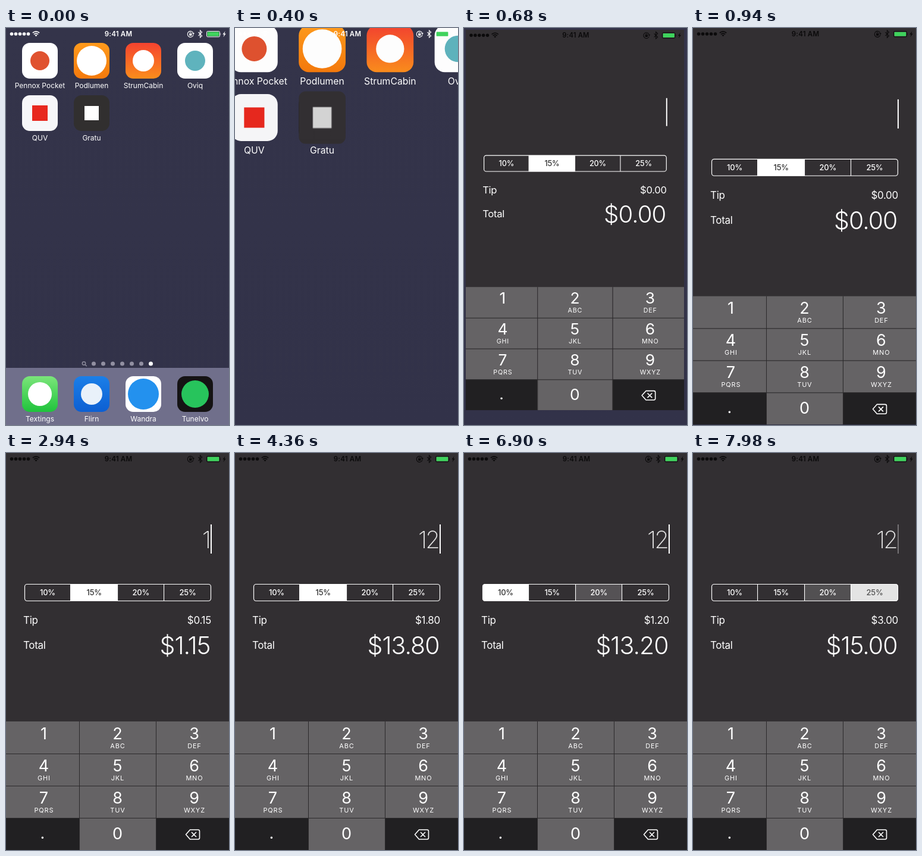
These frames come from a looping animation (375 px wide and 667 px high, 8 s). An HTML page:

```html
<!DOCTYPE html>
<html lang="en">
<head>
<meta charset="utf-8">
<title>Tip calculator</title>
<style>
  html, body { margin: 0; width: 100%; height: 100%; overflow: hidden; background: #333349; }
  svg { display: block; width: 375px; height: 667px; font-family: Inter, Roboto, sans-serif; fill: #fff; }
  .label { font-size: 12px; text-anchor: middle; }
  .clock { font-size: 11.5px; font-weight: 600; text-anchor: middle; letter-spacing: .2px; }
  .seg { font-size: 13px; font-weight: 500; text-anchor: middle; letter-spacing: -.2px; }
  .row { font-size: 17px; letter-spacing: -.3px; }
  .end { text-anchor: end; }
  .bill { font-size: 40px; font-weight: 200; letter-spacing: -3px; fill: #e4e4e4; }
  .total { font-size: 41px; font-weight: 300; letter-spacing: -1px; }
  .digit { font-size: 27px; text-anchor: middle; }
  .abc { font-size: 11px; text-anchor: middle; letter-spacing: .8px; }
</style>
</head>
<body>
<svg id="stage" viewBox="0 0 375 667"></svg>
<script>
const LOOP = 8000, OPEN = 380, SETTLED = 1400;
const DARK = '#322f32', KEY = '#656365', KEY_DOWN = '#212022';
const stage = document.getElementById('stage');

const text = (x, y, cls, str, extra = '') => `<text x="${x}" y="${y}" class="${cls}" ${extra}>${str}</text>`;
const rect = (x, y, w, h, extra = '') => `<rect x="${x}" y="${y}" width="${w}" height="${h}" ${extra}/>`;
const dot = (x, y, r, extra = '') => `<circle cx="${x}" cy="${y}" r="${r}" ${extra}/>`;
const times = (n, fn) => Array.from({ length: n }, (_, i) => fn(i)).join('');

function statusBar(color) {
  const line = `fill="none" stroke="${color}"`;
  return `<g fill="${color}">
    ${times(5, i => dot(9.5 + 7 * i, 10, 2.8))}
    <path d="M44.8 8.2Q50.5 3.4 56.2 8.2M46.9 10.6Q50.5 7.6 54.1 10.6" ${line} stroke-width="1.7"/>
    <path d="M48.4 12.1Q50.5 10.6 52.6 12.1L50.5 14.3Z"/>
    ${text(189, 14.2, 'clock', '9:41 AM')}
    <path d="M314.8 8.2A5 5 0 1 0 315 12" ${line} stroke-width="1.1"/>
    <path d="M313 8.6h4l-2 2.8z"/>
    ${rect(308.2, 9.4, 4.2, 3.4)}
    <path d="M309 9.6V8.6a1.3 1.3 0 0 1 2.6 0v1" ${line} stroke-width=".9"/>
    <path d="M323.4 7l6.2 6.2-3.1 2.9V4l3.1 2.9-6.2 6.2" ${line} stroke-width="1.1"/>
    ${rect(337.5, 5.5, 22, 9.4, `rx="1.8" ${line}`)}
    ${rect(338.6, 6.6, 19.8, 7.2, 'rx=".8" style="fill:#3fd35d"')}
    <path d="M360.6 8.4q1.6 1.7 0 3.4z"/>
    <path d="M368.6 5.2l-4.2 5.6h2.4l-1.4 4.4 4.4-5.8h-2.5z"/>
  </g>`;
}

const gradient = (id, top, bottom) => `<linearGradient id="${id}" x1="0" y1="0" x2="0" y2="1">
  <stop stop-color="${top}"/><stop offset="1" stop-color="${bottom}"/></linearGradient>`;

const round = (r, color) => (x, y) => dot(x + 30, y + 30, r, `fill="${color}"`);
const square = (a, color) => (x, y) => rect(x + 30 - a / 2, y + 30 - a / 2, a, a, `fill="${color}"`);

const apps = [
  ['Pennox Pocket', '#fff', round(16, '#e0522f')],
  ['Podlumen', 'url(#orange)', round(25, '#fff')],
  ['StrumCabin', 'url(#amber)', round(18, '#fff')],
  ['Oviq', '#fff', round(17, '#5fb3bd')],
  ['QUV', '#f7f7f9', square(26, '#e8281e')],
  ['Gratu', '#312f2f', square(24, '#fff')],
  ['Textings', 'url(#green)', round(20, '#fff')],
  ['Flirn', 'url(#blue)', round(18, '#e9f1fa')],
  ['Wandra', '#fff', round(26, '#2391ee')],
  ['Tunelvo', '#151314', round(23, '#27c45c')]
];

function appIcon([name, fill, mark], i) {
  const col = i < 6 ? i % 4 : i - 6;
  const x = 27 + 87 * col, y = i < 4 ? 25 : i < 6 ? 113 : 585;
  return rect(x, y, 60, 60, `rx="13" fill="${fill}"`) + mark(x, y) + text(x + 30, y + 76, 'label', name);
}

const home = `
  ${rect(0, 571, 375, 96, 'fill="#706f8b"')}
  ${apps.map(appIcon).join('')}
  <g fill="none" stroke="#8d8c9c" stroke-width="1.5">${dot(131, 563.5, 2.7)}<path d="M133 565.5l2.8 2.8"/></g>
  ${times(7, i => dot(147.5 + 16 * i, 564, 3.5, `fill="${i < 6 ? '#918fa1' : '#fff'}"`))}
  ${rect(114, 113, 60, 60, 'id="press" rx="13" fill="#000" opacity="0"')}`;

// Segmented control
const edges = [31, 108.5, 187.5, 265.5, 345], rates = [10, 15, 20, 25];
const segments = `<g clip-path="url(#segClip)">
    ${times(4, i => rect(edges[i], 220, edges[i + 1] - edges[i], 29, `id="fill${i}"`))}
  </g>
  ${rect(31.5, 220.5, 313, 28, 'rx="4" fill="none" stroke="#fff" stroke-width="1.2"')}
  ${times(3, i => rect(edges[i + 1] - .5, 220.5, 1.1, 28))}
  ${times(4, i => text((edges[i] + edges[i + 1]) / 2 + .3, 239, 'seg', rates[i] + '%', `id="rate${i}"`))}`;

// Number pad
const cols = [0, 123, 252, 375], mids = [63.5, 187.5, 316.5];
const groups = ['', 'ABC', 'DEF', 'GHI', 'JKL', 'MNO', 'PQRS', 'TUV', 'WXYZ'];
const pad = rect(0, 451, 375, 216, `fill="${KEY_DOWN}"`) +
  groups.map((abc, i) => {
    const c = i % 3, y = 451 + 54 * Math.floor(i / 3);
    return rect(cols[c], y, cols[c + 1] - cols[c], 54, `id="key${i + 1}" fill="${KEY}"`) +
      text(mids[c], y + 29.5, 'digit', i + 1) + text(mids[c] + .4, y + 45, 'abc', abc);
  }).join('') +
  rect(cols[1], 613, cols[2] - cols[1], 54, `fill="${KEY}"`) +
  text(187.5, 649, 'digit', 0) + text(61.5, 647.5, 'digit', '.') +
  `<g fill="#2c2a2c">${times(3, i => rect(0, 505 + 54 * i, 375, 1))}
    ${times(2, i => rect(cols[i + 1], 451, 1, 216))}</g>
  <path d="M309.5 633H323a2.5 2.5 0 0 1 2.5 2.5v11A2.5 2.5 0 0 1 323 649H309.5L302.5 641ZM312 637l8 8M320 637l-8 8"
    fill="none" stroke="#fff" stroke-width="1.6" stroke-linejoin="round"/>`;

stage.innerHTML = `<defs>
    ${gradient('wall', '#34344a', '#323249')}
    ${gradient('orange', '#ff9a1c', '#f57a0c')}
    ${gradient('amber', '#f4432f', '#fb8d1c')}
    ${gradient('green', '#7be57a', '#1fc33c')}
    ${gradient('blue', '#1b7fe8', '#0d5fd2')}
    <clipPath id="segClip">${rect(31, 220, 314, 29, 'rx="4.5"')}</clipPath>
    <clipPath id="appClip">${rect(0, 0, 375, 667, 'id="corner"')}</clipPath>
  </defs>
  ${rect(0, 0, 375, 667, 'fill="url(#wall)"')}
  <g id="home">${home}</g>
  <g id="homeBar">${statusBar('#fff')}</g>
  <g id="app" clip-path="url(#appClip)">
    ${rect(0, 0, 375, 667, `fill="${DARK}"`)}
    <g id="screen">
      ${statusBar('#0b0a0b')}
      ${text(342, 160, 'bill end', '', 'id="bill"')}
      ${rect(344, 120, 2, 49, 'id="caret"')}
      ${segments}
      ${text(29, 287, 'row', 'Tip')}${text(345, 287, 'row end', '', 'id="tip"')}
      ${text(29, 329, 'row', 'Total')}${text(343.5, 338, 'total end', '', 'id="total"')}
      ${pad}
    </g>
    <g id="splash" transform="scale(6.25 11.117)">${square(24, '#fff')(0, 0)}</g>
  </g>`;

const el = {};
stage.querySelectorAll('[id]').forEach(n => el[n.id] = n);
const set = (id, attrs) => { for (const k in attrs) el[id].setAttribute(k, attrs[k]); };
const show = (id, on) => { el[id].style.display = on ? '' : 'none'; };
const write = (id, str) => { if (el[id].textContent !== str) el[id].textContent = str; };
const clamp = v => Math.min(1, Math.max(0, v));
const span = (t, a, b) => b > a ? clamp((t - a) / (b - a)) : +(t >= a);
const mix = (a, b, k) => a + (b - a) * k;

// Critically damped spring, 0 to 1
const spring = (s, w) => s <= 0 ? 0 : 1 - (1 + w * s) * Math.exp(-w * s);

const typed = [[2700, 2840, 1], [3680, 3820, 2]];       // down, up, key
const taps = [[5340, 5480, 0], [6760, 7000, 2], [7600, 7860, 3]]; // down, up, segment
const blinks = [                                        // start, end, opacity
  [1580, 1700, 0], [2200, 2400, 1], [2700, 2700, 1], [3140, 3260, 0],
  [3680, 3680, 1], [4360, 4480, 0], [4980, 5180, 1], [5560, 5680, 0],
  [6180, 6380, 1], [7000, 7120, 0], [7360, 7560, 1], [7900, 8020, 0]
];

function drawOpening(t) {
  const opened = t >= SETTLED, s = t - OPEN;
  show('home', !opened);
  show('homeBar', !opened);
  show('app', s > 0);
  const p = opened ? 1 : spring(s, .0187), q = opened ? 1 : spring(s, .01575);
  const x = mix(114, 0, p), y = mix(113, 0, p);
  const w = mix(174, 375, p) - x, h = mix(173, 667, q) - y;
  const sx = w / 375, sy = h / 667, r = 13 * (1 - clamp(p * 1.3));
  set('app', { transform: `translate(${x} ${y}) scale(${sx} ${sy})` });
  set('corner', { rx: r / sx, ry: r / sy });
  set('home', {
    transform: `translate(${x + w / 2} ${y + h / 2}) scale(${w / 60}) translate(-144 -143)`,
    opacity: 1 - span(s, 20, 140)
  });
  set('homeBar', { opacity: 1 - span(s, 40, 225) });
  set('press', { opacity: t >= 120 ? .4 : 0 });
  set('screen', { opacity: span(s, 20, 130) });
  set('splash', { opacity: 1 - span(s, 0, 100) });
}

function drawSegments(t) {
  const level = [0, 1, 0, 0];
  let chosen = 1;
  for (const [down, up, i] of taps) {
    if (t < down) break;
    level[i] = .17;
    if (t < up) break;
    const k = 1 - (1 - span(t, up, up + 200)) ** 2;
    level[i] = mix(.17, 1, k);
    level[chosen] = 1 - k;
    chosen = i;
  }
  level.forEach((v, i) => {
    const ink = v <= .17 ? 255 : Math.round(mix(255, 48, (v - .17) / .83));
    set('fill' + i, { 'fill-opacity': v });
    set('rate' + i, { fill: `rgb(${ink},${ink},${ink})` });
  });
  return rates[chosen];
}

function draw(t) {
  drawOpening(t);
  const rate = drawSegments(t);

  let bill = '';
  for (const [down, up, key] of typed) {
    if (t >= down) bill += key;
    set('key' + key, { fill: t >= down && t < up ? KEY_DOWN : KEY });
  }
  const tip = bill * rate / 100;
  write('bill', bill);
  write('tip', '$' + tip.toFixed(2));
  write('total', '$' + (+bill + tip).toFixed(2));

  let caret = 1;
  for (const [a, b, to] of blinks) caret = mix(caret, to, span(t, a, b));
  set('caret', { opacity: caret });
}

function frame(now) {
  draw(now % LOOP);
  requestAnimationFrame(frame);
}
draw(0);
requestAnimationFrame(frame);
</script>
</body>
</html>
```
